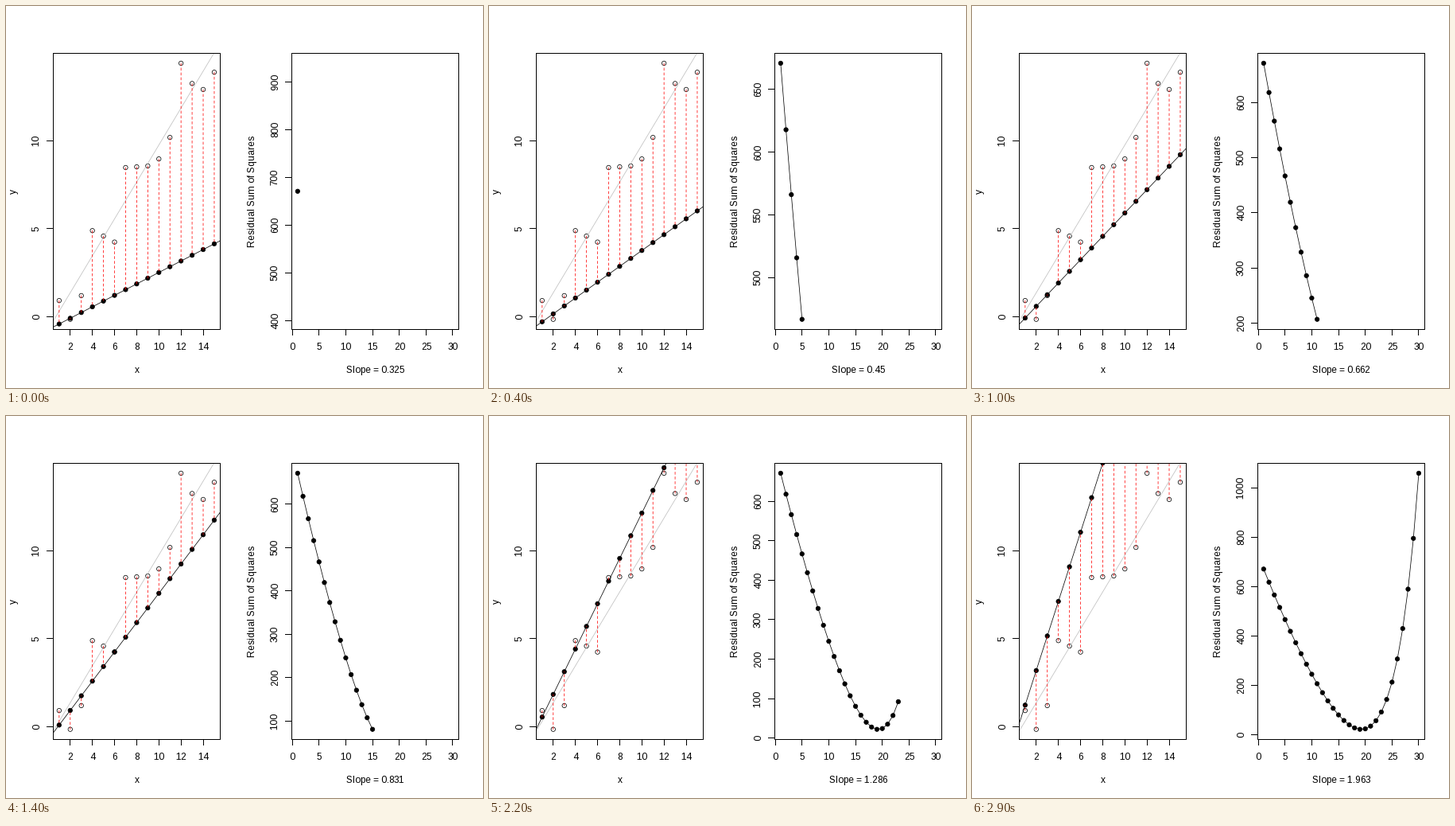
Recreate the animation shown at these times as a matplotlib script. Size 600 px wide and 480 px high, loop 3000 ms.

```python
import math

import matplotlib.pyplot as plt
import numpy as np
from matplotlib.animation import FuncAnimation
from matplotlib.collections import LineCollection

W, H, DPI = 600, 480, 96
PT = 72 / DPI                  # points per pixel
LINE = 0.75 * PT
STEPS = 30
TEXT_LINE = 14.4               # height of one margin line in pixels
TOP, BOTTOM = 59.04, 406.56
LEFT_BOX = (59.04, 269.76)
RIGHT_BOX = (359.04, 569.76)

plt.rcParams.update({
    "font.family": "Liberation Sans",
    "font.size": 12 * PT,
    "text.hinting": "force_autohint",
    "text.hinting_factor": 1,
})

x = np.arange(1, 16)
y = np.array([0.92, -0.145, 1.20, 4.89, 4.58, 4.24, 8.47, 8.51,
              8.56, 8.96, 10.18, 14.39, 13.24, 12.90, 13.88])
best_slope, intercept = np.polyfit(x, y, 1)
slopes = np.tan(np.linspace(0.1 * np.pi, 0.35 * np.pi, STEPS))
rss = np.array([np.sum((y - intercept - s * x) ** 2) for s in slopes])
trials = np.arange(1, STEPS + 1)


def padded(lo, hi):
    """Widen a range by four percent on each side."""
    if lo == hi:
        lo, hi = 0.6 * lo, 1.4 * hi
    pad = 0.04 * (hi - lo)
    return lo - pad, hi + pad


def nice_ticks(lo, hi):
    """About five round tick values that lie inside the range."""
    cell = (hi - lo) / 5
    base = 10 ** math.floor(math.log10(cell))
    unit = base
    for factor, bias in ((2, 0.8), (5, 1.7), (10, 0.8)):
        if factor * base - cell < bias * (cell - unit):
            unit = factor * base
        else:
            break
    return np.arange(math.ceil(lo / unit), math.floor(hi / unit) + 1) * unit


def crisp(v):
    return math.floor(v) + 0.5


fig = plt.figure(figsize=(W / DPI, H / DPI), dpi=DPI, facecolor="white")


def data_axes(box, xlim, ylim):
    ax = fig.add_axes([box[0] / W, 1 - BOTTOM / H,
                       (box[1] - box[0]) / W, (BOTTOM - TOP) / H])
    ax.set_axis_off()
    ax.set_xlim(*xlim)
    ax.set_ylim(*ylim)
    return ax


x_range, y_range = padded(1, 15), padded(y.min(), y.max())
trial_range = padded(1, STEPS)
fit_ax = data_axes(LEFT_BOX, x_range, y_range)
rss_ax = data_axes(RIGHT_BOX, trial_range, (0, 1))

page = fig.add_axes([0, 0, 1, 1])
page.set_axis_off()
page.patch.set_alpha(0)
page.set_xlim(0, W)
page.set_ylim(H, 0)


def stroke(xs, ys):
    return page.plot(xs, ys, color="black", lw=PT, snap=False,
                     solid_capstyle="projecting")[0]


def label(px, py, text, turn=0):
    return page.text(px, py, text, ha="center", va="baseline",
                     rotation=turn, rotation_mode="anchor")


def frame(box):
    l, r, t, b = (crisp(v) for v in (*box, TOP, BOTTOM))
    stroke([l, r, r, l, l], [t, t, b, b, t])


def x_axis(box, limits, values):
    scale = (box[1] - box[0]) / (limits[1] - limits[0])
    for v in values:
        px = box[0] + (v - limits[0]) * scale
        stroke([crisp(px)] * 2, [crisp(BOTTOM), crisp(BOTTOM + 7.2)])
        label(px, 432, f"{v:g}")


def y_axis(box, limits, values):
    scale = (BOTTOM - TOP) / (limits[1] - limits[0])
    artists = []
    for v in values:
        py = BOTTOM - (v - limits[0]) * scale
        artists.append(stroke([crisp(box[0] - 7.2), crisp(box[0])],
                              [crisp(py)] * 2))
        artists.append(label(box[0] - 1.2 * TEXT_LINE, py, f"{v:g}", 90))
    return artists


def dots(ax, xs, ys, fill, z):
    # A list of widths keeps the circles at sub-pixel positions.
    return ax.scatter(xs, ys, s=(5.4 * PT) ** 2, facecolors=fill,
                      edgecolors="black", linewidths=[LINE, LINE], zorder=z)


def line(ax, color, z):
    return ax.plot([], [], color=color, lw=LINE, zorder=z,
                   solid_capstyle="round", solid_joinstyle="round")[0]


middle = (TOP + BOTTOM) / 2
frame(LEFT_BOX)
frame(RIGHT_BOX)
x_axis(LEFT_BOX, x_range, range(2, 15, 2))
y_axis(LEFT_BOX, y_range, (0, 5, 10))
x_axis(RIGHT_BOX, trial_range, range(0, 31, 5))
label(sum(LEFT_BOX) / 2, 461, "x")
label(LEFT_BOX[0] - 3.2 * TEXT_LINE, middle, "y", 90)
label(RIGHT_BOX[0] - 3.2 * TEXT_LINE, middle, "Residual Sum of Squares", 90)
slope_label = label(sum(RIGHT_BOX) / 2, 461, "")

ends = np.array(x_range)
dots(fit_ax, x, y, "none", 1)
line(fit_ax, "#bebebe", 2).set_data(ends, intercept + best_slope * ends)
fit_line = line(fit_ax, "black", 3)
fit_dots = dots(fit_ax, x, y, "black", 4)
residuals = LineCollection([], colors="red", linewidths=LINE,
                           linestyles=[(0, (4, 4))], capstyle="round",
                           snap=False, zorder=5)
fit_ax.add_collection(residuals, autolim=False)

rss_line = line(rss_ax, "black", 1)
rss_dots = dots(rss_ax, trials, rss, "black", 2)
rss_ticks = []


def draw(i):
    slope = slopes[i]
    fitted = intercept + slope * x
    fit_line.set_data(ends, intercept + slope * ends)
    fit_dots.set_offsets(np.column_stack([x, fitted]))
    residuals.set_segments([[(a, b), (a, c)] for a, b, c in zip(x, y, fitted)])

    seen_x, seen = trials[:i + 1], rss[:i + 1]
    limits = padded(seen.min(), seen.max())
    rss_ax.set_ylim(*limits)
    rss_line.set_data(seen_x, seen)
    rss_dots.set_offsets(np.column_stack([seen_x, seen]))
    for artist in rss_ticks:
        artist.remove()
    rss_ticks[:] = y_axis(RIGHT_BOX, limits, nice_ticks(*limits))
    slope_label.set_text(f"Slope = {round(slope, 3):g}")
    return []


fit_ax.set_xlim(*x_range)
fit_ax.set_ylim(*y_range)
rss_ax.set_xlim(*trial_range)
page.set_xlim(0, W)
page.set_ylim(H, 0)

anim = FuncAnimation(fig, draw, frames=STEPS, interval=100,
                     init_func=lambda: [], repeat=True, repeat_delay=0)
plt.show()
```
